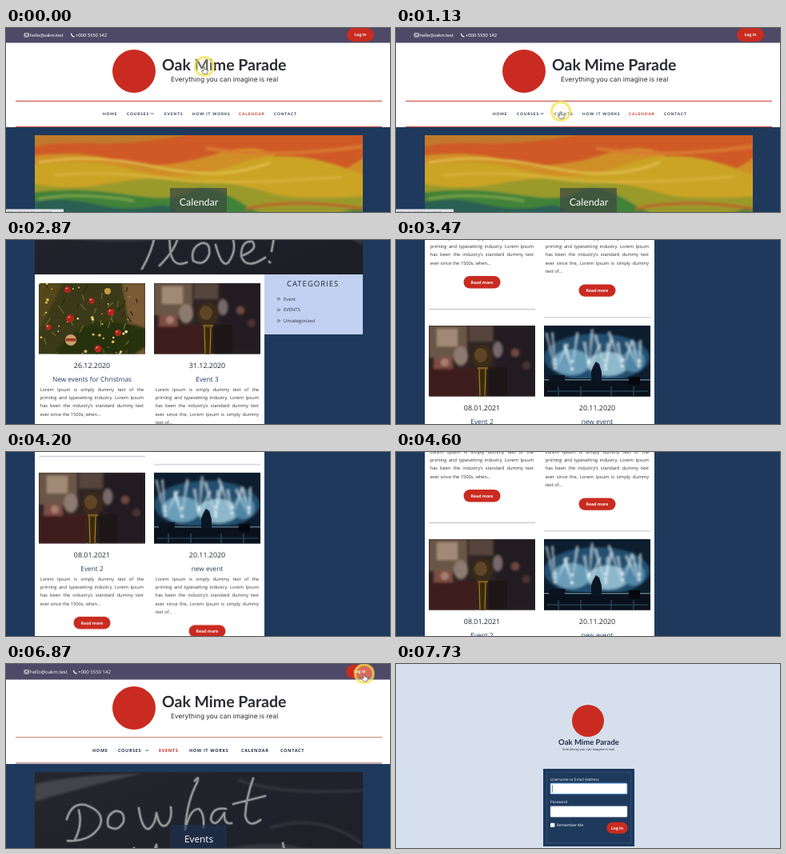
Animation of 480x230 px, one loop 8 s. Source, as an HTML page:

```html
<!DOCTYPE html>
<html lang="en">
<head>
<meta charset="utf-8">
<title>Drama school site tour</title>
<style>
html, body { margin: 0; width: 100%; height: 100%; overflow: hidden; background: #fff; }
#stage { display: block; width: 480px; height: 230px; font-family: "Open Sans", "Noto Sans", sans-serif; text-rendering: geometricPrecision; }
.lato { font-family: Lato, sans-serif; }
.inter { font-family: Inter, sans-serif; }
.mid { text-anchor: middle; }
.bold { font-weight: 700; }
.semi { font-weight: 500; }
.copy { font-size: 5.7px; line-height: 10.3px; color: #333; white-space: nowrap; }
.copy div { text-align: justify; text-align-last: justify; }
.copy div:last-child { text-align-last: left; }
.chalk { fill: none; stroke: #a6a6a8; stroke-linecap: round; stroke-linejoin: round; }
</style>
</head>
<body>
<svg id="stage" viewBox="0 0 480 230" xmlns="http://www.w3.org/2000/svg"></svg>
<script>
const LOOP = 8000;
const RED = '#c92b20', NAVY = '#1e395c', INK = '#20242e', BAR = '#4d4966';
const BRAND = 'Oak Mime Parade', MOTTO = 'Everything you can imagine is real';

const rect = (x, y, w, h, fill, more = '') =>
  `<rect x="${x}" y="${y}" width="${w}" height="${h}" fill="${fill}" ${more}/>`;
const disc = (x, y, r, fill, more = '') =>
  `<circle cx="${x}" cy="${y}" r="${r}" fill="${fill}" ${more}/>`;
const oval = (x, y, rx, ry, fill, more = '') =>
  `<ellipse cx="${x}" cy="${y}" rx="${rx}" ry="${ry}" fill="${fill}" ${more}/>`;
const path = (d, fill, more = '') => `<path d="${d}" fill="${fill}" ${more}/>`;
const line = (d, stroke, w = 1) =>
  `<path d="${d}" fill="none" stroke="${stroke}" stroke-width="${w}"/>`;
const soft = body => `<g filter="url(#soft)">${body}</g>`;
// y is the middle of the capitals
const text = (x, y, size, str, fill, cls = '', more = '') =>
  `<text x="${x}" y="${y + size * 0.36}" font-size="${size}" fill="${fill}" class="${cls}" ${more}>${str}</text>`;
const frame = (x, y, w, h, box, body) =>
  `<svg x="${x}" y="${y}" width="${w}" height="${h}" viewBox="${box}" overflow="hidden">${body}</svg>`;
const pill = (x, y, w, h, label, size = 5) =>
  rect(x, y, w, h, RED, `rx="${h / 2}"`) +
  text(x + w / 2, y + h / 2, size, label, '#fff', 'mid bold');

let seed = 7;
const rnd = () => (seed = (seed * 16807) % 2147483647) / 2147483647;

// ---------- pictures ----------
function painting() {
  return frame(36, 134, 410, 169, '36 134 410 169',
    rect(36, 134, 410, 169, '#cf5a26') + soft(
    path('M30 128H250Q180 146 110 144T30 152Z', '#c07a2c') +
    path('M30 160Q90 152 140 166T260 158T350 176T450 160V320H30Z', '#d08f28') +
    path('M30 172Q100 160 160 178T290 170T450 186V320H30Z', '#cba426') +
    path('M30 194Q80 204 130 194T240 190T330 206T450 210V320H30Z', '#9a9a2c') +
    path('M30 206Q90 198 150 208T230 204T300 222T450 222V320H30Z', '#3f8238') +
    path('M30 218Q70 210 110 220T190 222T240 320H30Z', '#2b5f52') +
    line('M40 168Q110 156 190 174T330 168', '#e0bf4c', 2.5) +
    line('M60 184Q130 178 200 188T420 186', '#d8b23a', 3) +
    line('M250 150Q330 164 446 148', '#d97a30', 4) +
    line('M40 214Q90 204 160 216', '#7ba24a', 3) +
    line('M300 226Q360 212 446 226', '#b8682c', 4)));
}

function chalkboard() {
  const words = [
    'M76 194Q82 173 99 176Q125 185 117 203Q106 222 77 221M91 183Q96 200 86 220',
    'M136 184Q124 190 128 203Q140 211 147 197Q149 183 136 184',
    'M166 180Q170 208 179 206Q187 200 188 186Q192 207 201 201Q208 194 206 179',
    'M236 146Q242 138 239 148Q226 172 224 207Q230 181 241 181Q248 186 247 204',
    'M275 181Q258 178 256 194Q261 207 273 186Q272 201 282 199',
    'M309 143Q300 168 299 190Q303 206 318 195M284 175L324 165',
    'M160 230Q166 250 180 246L188 226Q190 262 170 296M346 224Q350 236 342 252',
    'M192 292Q222 262 215 238Q202 232 205 270Q207 296 226 288',
    'M244 264Q230 270 234 286Q248 294 254 278Q256 262 244 264',
    'M262 266Q270 296 278 288Q288 274 284 260',
    'M294 280Q316 272 308 262Q294 260 294 280Q300 298 324 282M338 240L332 274M329 287L330 288'
  ].join('');
  return frame(36, 135, 410, 168, '36 135 410 168',
    rect(36, 135, 410, 168, 'url(#board)') +
    `<g opacity=".3">` + soft(
    path('M36 150Q90 138 170 137Q110 150 36 172Z', '#8b8e96') +
    line('M290 145Q350 165 446 158', '#6b6d76', 3) +
    line('M330 205Q390 185 446 225', '#6b6d76', 3) +
    line('M50 250Q170 270 260 240T446 262', '#6b6d76', 8)) + `</g>` +
    `<path class="chalk" stroke-width="4.2" opacity=".3" d="${words}"/>` +
    `<path class="chalk" stroke-width="2.2" opacity=".85" d="${words}"/>`);
}

function tree() {
  let s = rect(0, 0, 133, 89, '#3b3a18') + soft(
    path('M104 0H133V89H118Q112 50 104 0Z', '#7a5a34') +
    path('M0 0H30L0 60Z', '#55461c') +
    path('M20 89Q50 40 110 50T120 89Z', '#27300f'));
  for (let i = 0; i < 46; i++) {
    const x = rnd() * 122, y = rnd() * 89;
    s += line(`M${x} ${y}l${rnd() * 14 - 7} ${4 + rnd() * 6}`, i % 2 ? '#66692a' : '#222a0e', 1.3);
  }
  for (let i = 0; i < 34; i++)
    s += disc(rnd() * 120, rnd() * 89, 0.6 + rnd() * 1.3, i % 3 ? '#e6bb52' : '#f7e6a4');
  const red = [[39, 44, 5], [36, 8, 4], [90, 36, 4.5], [99, 62, 4], [12, 55, 3.5], [66, 22, 3.5], [74, 82, 4.5]];
  s += red.map(([x, y, r]) => disc(x, y, r, '#b3261c') + disc(x - 1.3, y - 1.5, 1, '#f0a48c')).join('');
  return s + disc(40, 71, 7, '#c9a06a') + rect(34, 69, 12, 3.5, '#a53426') + disc(86, 10, 4, '#c99a3c');
}

function mic() {
  return rect(0, 0, 133, 89, '#2f2524') + soft(
    rect(0, 0, 48, 40, '#6b5646') + rect(10, 4, 26, 22, '#a08a74') +
    rect(50, 0, 30, 20, '#57453c') + rect(82, 0, 51, 89, '#221c20') +
    rect(0, 52, 60, 37, '#3c1f1e') + rect(6, 40, 24, 14, '#7d4b42') +
    oval(40, 38, 9, 12, '#8d7a70') + oval(86, 30, 6, 10, '#77696a') +
    disc(20, 46, 5, '#a87e6e') + disc(108, 34, 5, '#70483f') + disc(122, 50, 5, '#4a3230') +
    rect(74, 52, 24, 37, '#1b1518')) +
    path('M61 50H73L71 89H62Z', '#3a2910') + line('M63 54L64 89M71 54L70 89', '#a8801f', 1.2) +
    oval(67, 39, 13, 15, '#3c2b1a') + oval(65, 37, 8, 9, '#5f4527') +
    rect(61, 52, 13, 2.5, '#7d5c20');
}

function concert() {
  let beams = '';
  for (let i = 0; i < 18; i++) {
    const x = 14 + (i % 6) * 21, lean = (rnd() - 0.5) * 34;
    beams += path(`M${x} 56L${x + lean - 1.5} ${4 + rnd() * 24}h3Z`, '#dff3fb', 'opacity=".7"') +
      disc(x, 56 - rnd() * 14, 1.6, '#f4fcff');
  }
  return rect(0, 0, 133, 89, '#0c1d2e') + soft(
    oval(66, 40, 66, 30, '#23506f') + oval(34, 46, 24, 16, '#6b9db8') +
    oval(80, 48, 26, 15, '#8db8cb') + oval(112, 44, 14, 14, '#4f86a5') + beams) +
    rect(0, 66, 133, 23, '#09111c') + rect(0, 67, 133, 1.5, '#5b7d92') +
    path('M59 70V57L62 50L65 45L69 48L72 58V70Z', '#0a1623') +
    rect(106, 64, 14, 10, '#04080d') + rect(6, 62, 20, 8, '#0a1420') +
    line('M4 82H130', '#35586e', 1.2) + line('M18 76V89M46 76V89M84 76V89M112 76V89', '#22384a', 2);
}

// ---------- pages ----------
function header(o) {
  const y = o.dy, nav = ['HOME', 'COURSES', 'EVENTS', 'HOW IT WORKS', 'CALENDAR', 'CONTACT'];
  return rect(0, 0, 480, 124 + y, '#fff') + rect(0, 0, 480, 18.5 + y, BAR) +
    `<g fill="none" stroke="#fff" stroke-width=".8"><rect x="23" y="${6.7 + y}" width="5.4" height="4.4" rx=".6"/>` +
    `<path d="M23 ${8 + y}l2.7 1.8l2.7-1.8"/>` +
    `<path stroke-width="1.3" d="M${o.phone - 5.5} ${6.8 + y}q.2 3.6 4 4.2"/></g>` +
    text(30, 9 + y, o.size, 'hello@oakm.test', '#fff', o.cls + ' semi') +
    text(o.phone, 9 + y, o.size, '+000 5550 142', '#fff', o.cls + ' semi') +
    pill(o.btn, y, 34, 17, 'Log In') +
    disc(160, 54 + y, 27, RED) +
    text(195, 46.2 + y, 19.5, BRAND, '#2b2c33', 'lato bold') +
    text(206, 64.3 + y, 8.3, MOTTO, '#2b2c33', 'inter') +
    rect(12, 90.8 + y * 0.3, 458, 1, o.rules[0]) + rect(12, 122.8 + y * 0.6, 458, 1, o.rules[1]) +
    nav.map((n, i) => text(o.xs[i], 107 + y, o.navSize, n, i === o.active ? RED : '#26304a',
      o.cls + ' bold', `letter-spacing="${o.gap}"`)).join('') +
    line(`M${o.chev} ${106.2 + y}l1.7 1.7l1.7-1.7`, '#26304a', 0.9);
}

const LEAD = ['Lorem Ipsum is simply dummy text of the', 'printing and typesetting industry. Lorem Ipsum',
  'has been the industry\u2019s standard dummy text'];
const SHORT = [...LEAD, 'ever since the 1500s, when...'];
const LONG = [...LEAD, 'ever since the, Lorem Ipsum is simply dummy', 'text of...'];

function card(x, y, pic, date, name, copy) {
  const end = y + 180 + (copy.length - 4) * 10.4;
  return frame(x, y, 133, 88.6, '0 0 133 88.6', pic) +
    text(x + 66.5, y + 103, 8.9, date, INK, 'mid') +
    text(x + 66.5, y + 120.2, 8.3, name, NAVY, 'mid') +
    `<foreignObject x="${x + 1.7}" y="${y + 127.8}" width="129.4" height="60"><div class="copy">` +
    copy.map(l => `<div>${l}</div>`).join('') + `</div></foreignObject>` +
    pill(x + 43.5, end, 46, 15.4, 'Read more', 5.2) +
    rect(x, end + 41, 133, 0.9, '#b9b5c6');
}

function calendarPage() {
  return rect(0, 0, 480, 230, NAVY) +
    header({ dy: 0, cls: 'lato', size: 5.7, phone: 87, btn: 426, navSize: 4.8, gap: 0.9, active: 4, chev: 181,
      xs: [121, 151, 198, 233, 291, 335], rules: ['#c4382c', '#c4382c'] }) +
    painting() + rect(205, 200, 71, 37, '#3c4a40', 'opacity=".75"') +
    text(241, 218, 12.4, 'Calendar', '#fff', 'lato mid');
}

function eventsPage() {
  const items = ['Event', 'EVENTS', 'Uncategorized'];
  return rect(0, 0, 480, 1100, NAVY) +
    header({ dy: 1, cls: '', size: 6, phone: 90, btn: 425, navSize: 5.5, gap: 0.65, active: 2, chev: 174.5,
      xs: [108, 140, 191, 229, 294, 343], rules: ['#c4806c', '#8e5056'] }) +
    chalkboard() + rect(205, 201, 71, 37, '#1c3354', 'opacity=".6"') +
    text(241, 219, 11.8, 'Events', '#fff', 'mid semi') +
    rect(36, 303, 287, 797, '#fff') +
    rect(323, 303, 123, 75, '#c2d0f1') +
    text(351, 315, 9.5, 'CATEGORIES', INK, '', 'letter-spacing="1"') +
    items.map((n, i) => text(347, 333.6 + i * 13.6, 5.8, n, '#2c3242') +
      line(`M339 ${332 + i * 13.6}l1.6 1.7l-1.6 1.7m2-3.4l1.6 1.7l-1.6 1.7`, '#2c3242', 0.7)).join('') +
    card(41, 314, tree(), '26.12.2020', 'New events for Christmas', SHORT) +
    card(185, 314, mic(), '31.12.2020', 'Event 3', LONG) +
    card(41, 556, mic(), '08.01.2021', 'Event 2', SHORT) +
    card(185, 556, concert(), '20.11.2020', 'new event', LONG);
}

function loginPage() {
  return rect(0, 0, 480, 230, '#d6dfec') + disc(240, 71, 20, RED) +
    text(241, 98, 9.5, BRAND, '#1f2c4a', 'lato bold mid') +
    text(240.5, 106.6, 4, MOTTO, '#2b3245', 'inter mid') +
    rect(184, 131, 114, 97, NAVY) +
    rect(188.5, 135.5, 105, 88, 'none', 'stroke="#34527a" stroke-width=".8"') +
    text(193, 144, 4.7, 'Username or Email Address', '#fff') +
    rect(193, 149, 96, 13.6, '#fff', 'rx="1" stroke="#4f94cf" stroke-width="1"') +
    rect(195.3, 151.2, 0.6, 9.4, '#333') +
    text(193, 172.8, 4.7, 'Password', '#fff') +
    rect(193, 177.7, 96, 13.6, '#fff', 'rx="1" stroke="#a9b4c4" stroke-width=".5"') +
    rect(193, 198.7, 5.4, 5.4, '#fff', 'rx="1"') +
    text(201, 201.4, 4.8, 'Remember Me', '#fff') +
    pill(263.3, 197.7, 26.4, 14.4, 'Log In');
}

const stage = document.getElementById('stage');
stage.innerHTML = `<defs>
  <filter id="soft" x="-10%" y="-10%" width="120%" height="120%"><feGaussianBlur stdDeviation="1.4"/></filter>
  <linearGradient id="board" x1="0" y1="0" x2="1" y2="1">
    <stop offset="0" stop-color="#25262d"/><stop offset=".5" stop-color="#20212a"/><stop offset="1" stop-color="#1c1d25"/>
  </linearGradient></defs>
  <g id="calendar">${calendarPage()}</g>
  <g id="events"><g id="scroll">${eventsPage()}</g></g>
  <g id="login">${loginPage()}</g>
  <g id="status">${rect(0, 226.4, 72, 4, '#dfe2e8')}${text(2, 230, 4.6, 'https://oakmime.example', '#555')}</g>
  <g id="cursor"><circle r="11.5" fill="#fffbe0" fill-opacity=".3" stroke="#f3e34c" stroke-opacity=".75" stroke-width="3"/>
    <path id="hand" d="M-1 1v5l-2-1.2l-.7 1l2.6 3.6h4.6l1-4.6l-3.8-1V1q-.8-1-1.7 0Z" fill="#fff" stroke="#333" stroke-width=".6"/>
    <path id="arrow" d="M0-1v6.6l1.6-1.5l1.1 2.4l1-.5l-1.1-2.3h2.2Z" fill="#fff" stroke="#444" stroke-width=".6"/></g>`;

// ---------- motion: rows of [ms, value] ----------
function play(id, prop, rows, jump = false) {
  const last = rows[rows.length - 1][1];
  document.getElementById(id).animate(
    [...rows, [LOOP, last]].map(([ms, v]) => ({ offset: ms / LOOP, [prop]: v, easing: jump ? 'step-end' : 'linear' })),
    { duration: LOOP, iterations: Infinity });
}
const show = (id, rows) => play(id, 'opacity', rows, true);
const move = (id, rows) =>
  play(id, 'transform', rows.map(([ms, x, y]) => [ms, `translate(${x}px, ${y}px)`]));

const OPEN = 1270, LOGIN = 7470;
show('calendar', [[0, 1], [OPEN, 0]]);
show('events', [[0, 0], [OPEN, 1], [LOGIN, 0]]);
show('login', [[0, 0], [LOGIN, 1]]);
show('status', [[0, 1], [OPEN, 0], [6900, 1], [LOGIN, 0]]);
show('cursor', [[0, 1], [2400, 0], [6270, 1], [LOGIN, 0]]);
show('hand', [[0, 1], [1340, 0], [6800, 1]]);
show('arrow', [[0, 0], [1340, 1], [6800, 0]]);

move('scroll', [[0, 0, 0], [2470, 0, 0], [2870, 0, -260], [2930, 0, -260], [3270, 0, -372],
  [3470, 0, -449], [3530, 0, -449], [3930, 0, -545], [4130, 0, -545], [4600, 0, -447], [4670, 0, -447],
  [4930, 0, -250], [5000, 0, -215], [5400, 0, 0]]);
move('cursor', [[0, 248, 48], [70, 248, 48], [870, 208, 99], [930, 208, 99], [1130, 206, 104], [OPEN, 206, 104],
  [1730, 475, 41], [1800, 475, 41], [2070, 479, 60], [2130, 479, 60], [2330, 496, 120],
  [6200, 496, 36], [6270, 484, 30], [6330, 470, 22], [6600, 470, 22], [6930, 443, 10]]);
</script>
</body>
</html>
```
